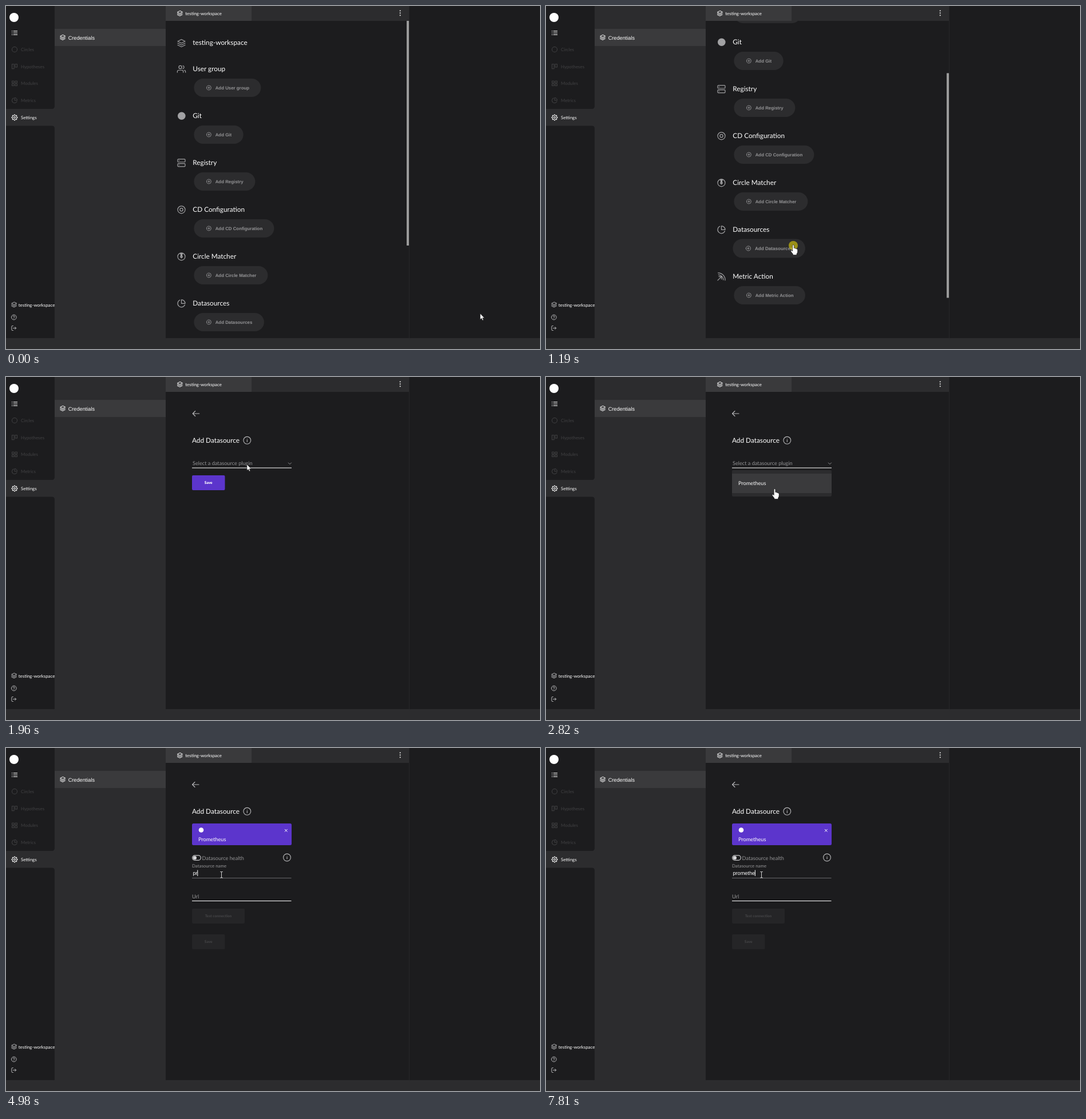
Animation of 933x600 px, one loop 8000 ms. Source, as an HTML page:

```html
<!DOCTYPE html>
<html lang="en">
<head>
<meta charset="utf-8">
<title>Add datasource</title>
<style>
  html, body { margin: 0; width: 100%; height: 100%; overflow: hidden; background: #1c1c1e; }
  svg { display: block; width: 100vw; height: 100vh; }
  text { font-family: Lato, sans-serif; text-rendering: geometricPrecision; white-space: pre; }
  .arial { font-family: "Liberation Sans", Arial, sans-serif; }
</style>
</head>
<body>
<svg id="stage" viewBox="0 0 933 600" preserveAspectRatio="none"></svg>
<script>
const LOOP = 8000;
const DARK = '#1c1c1e', PANEL = '#2c2c2e', RAISED = '#3a3a3c';
const WHITE = '#fff', GRAY = '#949496', FAINT = '#414143', PURPLE = '#5c35cc';
const SMALL = 7.87, BODY = 9.19, TITLE = 11.8;

// ---------- drawing helpers ----------
const rect = (x, y, w, h, fill, rx = 0) =>
  `<rect x="${x}" y="${y}" width="${w}" height="${h}" rx="${rx}" fill="${fill}"/>`;
const dot = (x, y, r, fill) => `<circle cx="${x}" cy="${y}" r="${r}" fill="${fill}"/>`;
const text = (x, y, str, size, fill = WHITE, extra = '') =>
  `<text x="${x}" y="${y}" font-size="${size}" fill="${fill}" ${extra}>${str}</text>`;
const line = (d, color, width = 1) =>
  `<path d="${d}" fill="none" stroke="${color}" stroke-width="${width}" stroke-linecap="round" stroke-linejoin="round"/>`;
const group = (id, body, shown = true) =>
  `<g id="${id}"${shown ? '' : ' display="none"'}>${body}</g>`;

const ring = (x, y, r) => `M${x - r} ${y}a${r} ${r} 0 1 0 ${2 * r} 0a${r} ${r} 0 1 0 ${-2 * r} 0z`;
const box = (x, y, w, h) => `M${x} ${y}h${w}v${h}h${-w}z`;

const gear = () => {
  const points = [];
  for (let i = 0; i < 32; i++) {
    const a = (i - .5) * Math.PI / 16, r = i % 4 < 2 ? 11 : 8.4;
    points.push(`${(12 + r * Math.cos(a)).toFixed(1)} ${(12 + r * Math.sin(a)).toFixed(1)}`);
  }
  return `M${points.join('L')}z${ring(12, 12, 3.4)}`;
};

// Outline icons on a 24 unit grid
const ICONS = {
  layers: 'M12 2 2 7l10 5 10-5zM2 17l10 5 10-5M2 12l10 5 10-5',
  users: 'M17 21v-2a4 4 0 0 0-4-4H5a4 4 0 0 0-4 4v2M23 21v-2a4 4 0 0 0-3-3.9M16 3.1a4 4 0 0 1 0 7.8' + ring(9, 7, 4),
  server: 'M4 2h16a2 2 0 0 1 2 2v4a2 2 0 0 1-2 2H4a2 2 0 0 1-2-2V4a2 2 0 0 1 2-2z' +
    'M4 14h16a2 2 0 0 1 2 2v4a2 2 0 0 1-2 2H4a2 2 0 0 1-2-2v-4a2 2 0 0 1 2-2zM6 6h.1M6 18h.1',
  disc: ring(12, 12, 10) + ring(12, 12, 4),
  matcher: ring(12, 12, 10) + 'M9 4h6l-2 4 2 5-3 3-3-3 2-5zM12 5v9',
  pie: 'M21.2 15.9A10 10 0 1 1 8 2.8M22 12A10 10 0 0 0 12 2v10z',
  action: 'M3 2a19 19 0 0 1 19 20M4 7a14 14 0 0 1 13 14M2 22l10-10M5 12h7v7',
  circle: ring(12, 12, 10),
  columns: box(2, 3, 8, 18) + box(14, 3, 8, 12),
  grid: box(2, 3, 8, 7) + box(14, 3, 8, 7) + box(2, 14, 8, 7) + box(14, 14, 8, 7),
  list: 'M8 5h14M8 12h14M8 19h14M2 5h1M2 12h1M2 19h1',
  gear: gear(),
  help: ring(12, 12, 10) + 'M9 9a3 3 0 0 1 6 1c0 2-3 2.500-3 4M12 17h.1',
  exit: 'M9 21H5a2 2 0 0 1-2-2V5a2 2 0 0 1 2-2h4M16 17l5-5-5-5M21 12H9',
  plus: ring(12, 12, 10) + 'M12 7.500v9M7.500 12h9',
  info: ring(12, 12, 10) + 'M12 16v-5M12 8h.1'
};
const icon = (name, cx, cy, size, color, width = 1) => {
  const k = size / 24;
  return `<g transform="translate(${cx - size / 2} ${cy - size / 2}) scale(${k})">${line(ICONS[name], color, width / k)}</g>`;
};

// ---------- fixed frame of the app ----------
const navItem = ([label, name, y, color]) =>
  icon(name, 15, y, 10.8, color) + text(26, y + 2.8, label, SMALL, color);

const chrome = () =>
  rect(0, 0, 279, 600, PANEL) +
  `<path d="M0 0H85V175q0 5-5 5H0zM0 209.500H80q5 0 5 5V581H0z" fill="${DARK}"/>` +
  dot(14, 20, 8, WHITE) +
  icon('list', 15, 47, 11, '#e4e4e4', 1.2) +
  [['Circles', 'circle', 76, FAINT], ['Hypotheses', 'columns', 105.7, FAINT],
   ['Modules', 'grid', 135.4, FAINT], ['Metrics', 'pie', 165.1, FAINT],
   ['Settings', 'gear', 195, WHITE]].map(navItem).join('') +
  icon('layers', 14, 522.5, 10.5, '#b4b4b6') + text(21.8, 525.8, 'testing-workspace', SMALL) +
  icon('help', 13.8, 544.5, 10.5, '#b4b4b6') + icon('exit', 13.8, 563.5, 10.5, '#b4b4b6') +
  rect(85, 40, 194, 30, RAISED) +
  icon('layers', 99, 55, 10.5, WHITE) +
  text(108.7, 58.7, 'Credentials', BODY, WHITE, 'class="arial"') +
  rect(279, 0, 425.5, 26, PANEL) + rect(279, 0, 150, 26, RAISED) +
  icon('layers', 303.7, 13, 10.5, WHITE) + text(313.3, 15.8, 'testing-workspace', SMALL) +
  [8.3, 12.3, 16.3].map(y => dot(688.7, y, 1.1, '#e0e0e0')).join('') +
  rect(704, 26, 1, 555, '#262628') + rect(0, 581, 933, 19, PANEL);

// ---------- scrolling list of sections ----------
const SECTIONS = [
  ['User group', 'users', 117], ['Git', '', 86.3], ['Registry', 'server', 107],
  ['CD Configuration', 'disc', 140], ['Circle Matcher', 'matcher', 129],
  ['Datasources', 'pie', 122.5], ['Metric Action', 'action', 124.5]
];
const section = ([label, name, width], i) => {
  const y = 110 + 82 * i;
  return (name ? icon(name, 306.5, y + .3, 15.6, '#a2a2a4', 1.2) : dot(306.8, y + .3, 6.8, '#a2a2a4')) +
    text(326.3, y + 3.6, label, TITLE) +
    group('button' + i, rect(328.4, y + 17, width, 32, PANEL, 16) +
      icon('plus', 354.5, y + 33, 9.4, GRAY, .9) +
      text(365.7, y + 35.8, 'Add ' + label, SMALL, GRAY, 'class="arial" font-weight="700"'));
};
const listPage = () =>
  `<g clip-path="url(#view)">` + group('list',
    icon('layers', 306.5, 65, 15.6, '#a2a2a4', 1.2) +
    text(326.3, 67.5, 'testing-workspace', TITLE) + SECTIONS.map(section).join('')) + '</g>' +
  `<rect id="thumb" x="700" y="26" width="4" height="393" fill="#9a9a9a"/>`;

// ---------- datasource pages ----------
const flatButton = (y, w, label, fill, color) => rect(325, y, w, 26, fill, 2) +
  text(325 + w / 2, y + 15.1, label, 6.56, color, 'font-weight="900" text-anchor="middle"');

const formHead = () =>
  group('back', line('M337 64H325.500M330 59.500L325.500 64L330 68.500', '#b8b8ba', 1.1)) +
  text(325, 115.3, 'Add Datasource', TITLE) + icon('info', 421.3, 110.8, 15.4, '#b8b8ba', 1.1);

const selectPage = () =>
  text(326, 153.6, 'Select a datasource plugin', BODY, GRAY) +
  line('M493.300 150l2.600 2.600 2.600-2.600', GRAY) + rect(325, 158.5, 174, 1, WHITE) +
  flatButton(172, 57.5, 'Save', PURPLE, WHITE) +
  group('menu', rect(325, 163, 174, 46, PANEL, 2) + rect(325, 169, 174, 34, RAISED) +
    text(336, 189.3, 'Prometheus', BODY), false) +
  group('selectCaret', rect(326, 147, 1, 9, WHITE), false);

const detailPage = () =>
  rect(325, 132, 174, 38, PURPLE, 2.5) + dot(341, 143.5, 4.3, WHITE) +
  text(336, 162.7, 'Prometheus', BODY) + line('M487.300 142.300l4 4m0-4l-4 4', WHITE) +
  `<rect x="325.6" y="187.900" width="14.800" height="8.400" rx="4.200" fill="none" stroke="#c8c8ca" stroke-width="1.200"/>` +
  dot(329.8, 192.1, 3.2, '#d8d8da') +
  text(342.6, 195.5, 'Datasource health', BODY, GRAY) + icon('info', 491, 191.5, 15.4, '#b8b8ba', 1.1) +
  `<text id="nameLabel" x="325" fill="${GRAY}">Datasource name</text>` +
  `<rect id="nameRule" x="325" y="227" width="173.500" height="1"/>` +
  `<text id="typed" class="arial" x="326.400" y="222.200" font-size="${BODY}" fill="#fff"></text>` +
  `<rect id="caret" y="213.500" width="1" height="10.500" fill="#fff"/>` +
  text(325, 262.6, 'Url', BODY, GRAY) + rect(325, 267, 173.5, 1, WHITE) +
  flatButton(281, 92, 'Test connection', '#252527', FAINT) +
  flatButton(326, 57.5, 'Save', '#252527', FAINT);

// ---------- pointer, drawn around its hot spot ----------
const pointer = () => group('pointer',
  group('press', `<circle r="8" fill="#ffea00" opacity=".52"/>`) +
  group('arrow', `<path d="M0 0V10.500L2.400 8.300L4 12L5.700 11.300L4.100 7.700H7.400Z" fill="#fff" stroke="#111" stroke-width=".5"/>`) +
  group('hand', `<path d="M-1.300 0Q-1.300-1.300 0-1.300T1.300 0V4.500Q3.200 4 3.500 5.300Q5.300 4.800 5.600 6Q7.600 5.700 7.600 7.500V11Q7.400 13 6 14.500V16.500H-.5V15L-4 10.500Q-5 8.500-3.300 8.200L-1.300 9.800Z" fill="#fff" stroke="#111" stroke-width=".6"/>`) +
  group('beam', line('M-1.800-4.500H-.5L0-4L.5-4.500H1.800M0-4V5.500M-1.800 6H-.5L0 5.500L.5 6H1.800', '#e8e8e8', .9)));

const stage = document.getElementById('stage');
stage.innerHTML =
  `<defs><clipPath id="view"><rect x="279" y="26" width="421" height="554"/></clipPath></defs>` +
  rect(0, 0, 933, 600, DARK) + chrome() +
  group('listPage', listPage()) + group('formHead', formHead()) +
  group('selectPage', selectPage()) + group('detailPage', detailPage()) + pointer();

const parts = {};
stage.querySelectorAll('[id]').forEach(el => parts[el.id] = el);

// ---------- timing ----------
const SCROLL = [[360, 0], [434, 18], [507, 48], [580, 69], [652, 92], [725, 118], [798, 129]];
const PATH = [
  [0, 828.5, 538], [70, 823, 532], [434, 571, 265], [880, 571, 272], [1110, 432, 419],
  [1345, 432, 419], [1655, 425, 172], [1959, 421, 153], [2112, 421, 153], [2496, 400.5, 194],
  [2590, 399.5, 197], [3040, 399.5, 197], [3359, 394.5, 206], [3670, 376.5, 221]
];
const PRESSES = [[1110, 1340], [2030, 2180], [2970, 3045], [3910, 4060]];
const KEYS = [4900, 4980, 5760, 5910, 6140, 6290, 6930, 7810];
const WORD = 'promethe';
const OPEN_FORM = 1344, OPEN_MENU = 2110, CHOOSE = 3045, FOCUS = 3910;
// Bursts of motion: start and interval, ten intervals each
const BURSTS = [[70, 72.8], [880, 77.5], [1730, 76.6], [2590, 80], [2970, 77.9]];

const between = (t, a, b) => t >= a && t < b;
const show = (id, on) => parts[id].setAttribute('display', on ? 'inline' : 'none');
const set = (id, attrs) => {
  for (const key in attrs) parts[id].setAttribute(key, attrs[key]);
};

function stepped(t) {
  const burst = BURSTS.filter(b => t >= b[0]).pop();
  return burst ? burst[0] + burst[1] * Math.min(10, Math.floor((t - burst[0]) / burst[1])) : 0;
}

function track(points, t, column = 1) {
  const i = points.findIndex(p => p[0] > t);
  if (i === 0) return points[0][column];
  if (i < 0) return points[points.length - 1][column];
  const a = points[i - 1], b = points[i];
  return a[column] + (b[column] - a[column]) * (t - a[0]) / (b[0] - a[0]);
}

function drawList(time) {
  const scroll = track(SCROLL, time);
  set('list', { transform: `translate(0 ${-scroll})` });
  set('thumb', { y: 26 + scroll * .709 });
  const hover = time >= 1030 ? 1.033 : 1;
  set('button5', { transform: `translate(389.700 553) scale(${hover}) translate(-389.700 -553)` });
}

function drawField(t) {
  const focused = t >= FOCUS;
  const lift = Math.max(0, Math.min(1, (t - FOCUS + 40) / 190)) * focused;
  set('nameLabel', { y: 222.7 - 14 * lift, 'font-size': BODY - (BODY - SMALL) * lift });
  set('nameRule', { fill: focused ? '#66666a' : WHITE });
  const count = KEYS.filter(k => t >= k).length;
  const value = WORD.slice(0, count);
  if (parts.typed.textContent !== value) parts.typed.textContent = value;
  const width = count ? parts.typed.getComputedTextLength() : 0;
  set('caret', { x: 326.1 + width });
  const lastInput = count ? KEYS[count - 1] : 3985;
  show('caret', between(t - lastInput, 0, count ? 530 : 535));
}

function render(t) {
  const time = stepped(t);
  show('listPage', t < OPEN_FORM);
  show('formHead', t >= OPEN_FORM);
  show('selectPage', between(t, OPEN_FORM, CHOOSE));
  show('detailPage', t >= CHOOSE);
  show('menu', t >= OPEN_MENU);
  show('selectCaret', between(t, OPEN_MENU, 2590));
  set('back', { transform: `translate(${t < 2036 ? .7 : 0} 0)` });
  drawList(time);
  drawField(t);

  set('pointer', { transform: `translate(${track(PATH, time)} ${track(PATH, time, 2)})` });
  const beam = t >= 3590;
  const hand = between(t, 1030, OPEN_FORM) || between(t, 2430, CHOOSE);
  show('beam', beam);
  show('hand', hand);
  show('arrow', !beam && !hand);
  show('press', PRESSES.some(([a, b]) => between(t, a, b)));
}

const start = performance.now();
function tick() {
  render((performance.now() - start) % LOOP);
  requestAnimationFrame(tick);
}
tick();
</script>
</body>
</html>
```
